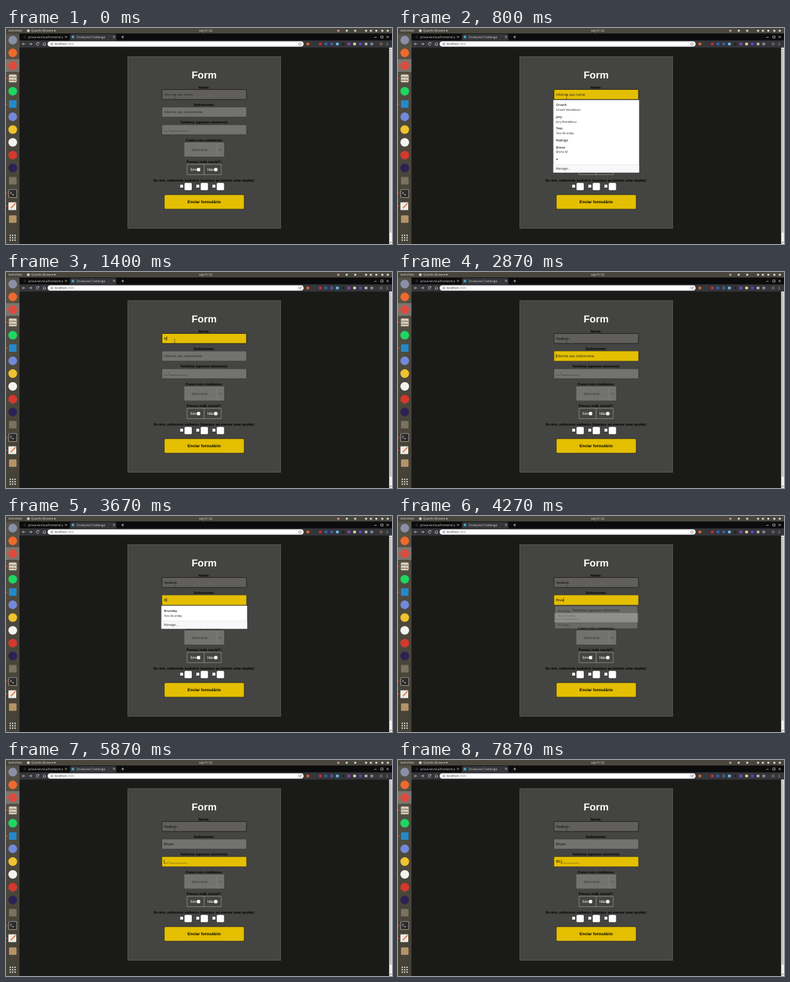
Recreate the animation shown at these times as an HTML page. Size 640x360 px, loop 8 s.

```html
<!DOCTYPE html>
<html lang="pt-BR">
<head>
<meta charset="utf-8">
<title>Form</title>
<style>
  html, body { margin: 0; width: 100%; height: 100%; overflow: hidden; background: #1a1a18; }
  svg { display: block; width: 640px; height: 360px; text-rendering: geometricPrecision; }
  text { white-space: pre; }
  .ui { font: 5.1px "Open Sans", "Noto Sans", sans-serif; fill: #deddda; }
  .page { font: 6px "Liberation Sans", Arial, sans-serif; }
  .label { font-weight: bold; text-anchor: middle; }
  .line { fill: none; stroke: #d0d0d0; stroke-width: .8; }
</style>
</head>
<body>
<svg viewBox="0 0 640 360">
  <defs>
    <linearGradient id="dockFill" x2="0" y2="1">
      <stop stop-color="#575349"/><stop offset=".4" stop-color="#4c483d"/><stop offset="1" stop-color="#454136"/>
    </linearGradient>
    <filter id="soft"><feGaussianBlur stdDeviation=".7"/></filter>
  </defs>

  <!-- desktop bar and browser frame -->
  <rect width="640" height="360" fill="#1a1a18"/>
  <rect width="640" height="9.3" fill="#49463e"/>
  <rect x="22" y="9.3" width="618" height="11.7" fill="#0c0c0d"/>
  <path d="M104 21q2 0 2-2v-6q0-3 3-3h71q3 0 3 3v6q0 2 2 2z" fill="#35363a"/>
  <rect x="22" y="20.6" width="618" height="12" fill="#35363a"/>
  <rect x="69" y="22.2" width="424.5" height="8.8" rx="4.4" fill="#fff"/>
  <g class="ui">
    <text x="4" y="6.4" font-size="5.5">Activities</text>
    <circle cx="37" cy="4.6" r="2.4" fill="#c9c9c7"/>
    <text x="42" y="6.4">Quenlo Browse</text>
    <path d="M79 3.7h4l-2 2.4z"/>
    <text x="331" y="6.4" text-anchor="middle">seg 01:26</text>
    <circle cx="31" cy="15" r="2.4" fill="#202124"/>
    <text x="37" y="16.7" font-size="5">prova-tecnica/frontend a</text>
    <circle cx="111" cy="15" r="2.3" fill="#3fa3c8"/>
    <text x="117" y="16.7" font-size="5">Orvalume Challenge</text>
    <text x="80.5" y="28.3" font-size="4.8" style="fill:#202124">localhost<tspan fill="#7b7f85">:3000</tspan></text>
  </g>
  <path class="line" d="M98 13.4l3 3m0-3l-3 3M177.5 13.4l3 3m0-3l-3 3M191 15h5m-2.5-2.5v5
    M32 26.6h-5m2.2-2.2l-2.2 2.2 2.2 2.2M38 26.6h5m-2.2-2.2l2.2 2.2-2.2 2.2
    M54.3 25.2a2.3 2.3 0 1 0 .2 2.3M54.6 23.8v1.8h-1.8
    M61 26.6l2.6-2.4 2.6 2.4M61.9 26.2v2.6h3.4v-2.6
    M610.5 15.5h4M621.5 13.2h3.6v3.6h-3.6zM631 13.2l3.6 3.6m0-3.6l-3.6 3.6"/>
  <path d="M76 25.6v2.4" stroke="#5f6368" stroke-width=".6"/>
  <circle cx="76" cy="26.6" r="1.9" fill="none" stroke="#5f6368" stroke-width=".6"/>
  <path d="M487.5 24l.8 1.9 2 .1-1.6 1.3.6 2-1.8-1.1-1.8 1.1.6-2-1.6-1.3 2-.1z" fill="none" stroke="#5f6368" stroke-width=".6"/>
  <circle cx="622" cy="26.6" r="2.8" fill="#6b5448"/>
  <g fill="#d0d0d0"><circle cx="632" cy="24.6" r=".6"/><circle cx="632" cy="26.6" r=".6"/><circle cx="632" cy="28.6" r=".6"/></g>
  <g id="tray"></g>
  <rect x="635.3" y="32.6" width="4.7" height="327.4" fill="#f1f1f1"/>
  <rect x="636" y="38" width="3.4" height="303" fill="#c3c3c1"/>
  <path d="M636.3 36.5h2.8l-1.4-2zM636.3 356.5h2.8l-1.4 2z" fill="#505050"/>

  <!-- dock -->
  <rect y="9.3" width="22.3" height="350.7" fill="url(#dockFill)"/>
  <rect y="52" width="22.3" height="21" fill="#fff" opacity=".22"/>
  <g id="dock"></g>

  <!-- form card -->
  <rect x="201.5" y="47.3" width="254.3" height="287" fill="#5c5c5a" filter="url(#soft)"/>
  <rect x="202.5" y="48.3" width="252.3" height="285" fill="#444442"/>
  <g class="page">
    <text class="label" x="328.5" y="84.3" font-size="16.7" fill="#fff">Form</text>
    <g id="labels"></g>
    <rect x="296" y="191" width="65.3" height="23" rx="1" fill="#727270" stroke="#8d8d8b" stroke-width=".35"/>
    <path d="M349.3 194v17.5" stroke="#92928f" stroke-width=".4"/>
    <path d="M353.8 201.8l1.6 1.6 1.6-1.6" fill="none" stroke="#222" stroke-width=".8"/>
    <text x="307.5" y="204.6" fill="#353533">Selecione...</text>
    <g fill="#fff">
      <path d="M300.2 227.2h56.6v17.2h-56.6zM328.5 227.2v17.2" fill="none" stroke="#ddd" stroke-width=".45"/>
      <text x="305.5" y="238.2">Sim</text><circle cx="319.2" cy="236" r="3"/>
      <text x="333.7" y="238.2">Não</text><circle cx="347.8" cy="236" r="3"/>
      <g id="networks"></g>
    </g>
    <rect x="262.6" y="278" width="132.2" height="23.8" rx="2" fill="#e4bf00" stroke="#000" stroke-width=".4"/>
    <text class="label" x="328.6" y="292.2" font-size="6.67">Enviar formulário</text>
  </g>
  <g id="live"></g>
</svg>
<script>
const LOOP = 8000, YELLOW = "#e4bf00", MASK = "__-_________";
const el = id => document.getElementById(id);
const square = (x, y, size, fill, r = 0) =>
  `<rect x="${x - size / 2}" y="${y - size / 2}" width="${size}" height="${size}" rx="${r}" fill="${fill}"/>`;
const disc = (x, y, r, fill) => `<circle cx="${x}" cy="${y}" r="${r}" fill="${fill}"/>`;
const text = (x, y, s, attrs = "") => `<text x="${x}" y="${y}" ${attrs}>${s}</text>`;

// Fixed details
el("tray").innerHTML =
  [551, 565, 579, 597, 605, 614, 624, 633].map((x, i) =>
    i % 2 ? disc(x, 4.6, 1.8, "#d5d4d1") : square(x, 4.6, 3.2, i ? "#d5d4d1" : "#d9a093", .6)).join("") +
  ["#e8632c", "#d02a33", "#2f62b8", "#3d5fae", "#6cc0e8", "#242528", "#8e44c9", "#e0d8b0", "#7040d0", "#b5b5b5", "#8b8c8f"]
    .map((c, i) => square(i ? 511.5 + i * 9.5 : 500.5, 26.6, 4.4, c, .8)).join("");

const dockColors = ["#8a8fa8", "#ee6a2b", "#dd4b3e", "", "#1ed760", "#2489ca", "#7289da", "#f0c22e",
  "#f2f4f0", "#d5382c", "#2c2255", "#77735f", "", "", "#b49468"];
el("dock").innerHTML = dockColors.map((c, i) => {
  const y = 20.2 + i * 21.3;
  if (i === 3) return square(11.2, y, 13, "#d8cfbf", 1.5) +
    `<path d="M5 ${y - 2}h12M5 ${y + 3}h12" stroke="#7d6c55" stroke-width="1.2"/>`;
  if (i === 12) return square(11.2, y, 14, "#b8b6b0", 1.5) + square(11.2, y, 12.5, "#2b2b2b", 1) +
    `<path d="M7 ${y - 3}l2 2-2 2m3 1h3" fill="none" stroke="#eee"/>`;
  if (i === 13) return square(10.5, y, 13, "#ecebe7", 1) +
    `<path d="M8 ${y + 3}l8-8" stroke="#e8772e" stroke-width="2"/>`;
  return [5, 11, 14].includes(i) ? square(11.2, y, 12.5, c, 1.5) : disc(11.2, y, 7.2, c);
}).join("") +
  [2, 3, 5, 12, 13].map(i => disc(1.2, 20.2 + i * 21.3, 1, "#e95420")).join("") +
  [0, 1, 2, 3, 4, 5, 6, 7, 8].map(i => square(7 + i % 3 * 4, 345.5 + (i / 3 | 0) * 4, 2.2, "#eee", .5)).join("");

el("labels").innerHTML = [
  [100.5, "Nome:"], [129.8, "Sobrenome:"], [159.1, "Telefone (apenas números):"], [188.5, "Como nos conheceu:"],
  [225.2, "Possui rede social?:"], [255.9, "Se sim, selecione embaixo (marque ao menos uma opção):"],
].map(([y, s]) => text(328.6, y, s, 'class="label"')).join("");

el("networks").innerHTML = [291.2, 318, 344.7].map(x =>
  square(x, 263.6, 4.8, "#fff", .6) + square(x + 10.8, 264.2, 12, "#fff", 1.5)).join("");

// Moving parts
const pen = document.createElement("canvas").getContext("2d");
pen.font = '60px "Liberation Sans", Arial, sans-serif';
const widthOf = s => pen.measureText(s).width / 10;
const typed = (word, times, t) => word.slice(0, times.filter(at => at <= t).length);

function field(y, value, { hint = "", focused, hovered, caret, caretAfter = value }) {
  const fill = focused ? YELLOW : hovered ? "#605f5c" : "#727270";
  const x = 262.3 + widthOf(caretAfter);
  return `<g class="page"><rect x="258.6" y="${y}" width="140.2" height="16.6" rx="1.3" fill="${fill}"
      stroke="#11110d" stroke-width="${hovered ? .8 : .35}"/>` +
    text(262, y + 10.2, value || hint, `fill="${value ? "#111" : "#30302e"}"`) +
    (focused && caret ? `<path d="M${x} ${y + 4.8}v6.6" stroke="#000" stroke-width=".6"/>` : "") + "</g>";
}

function menu(top, height, rows, openAt, closeAt, t) {
  if (t < openAt) return "";
  // The closing menu fades and shrinks in a few coarse ticks
  const p = t < closeAt ? 0 : Math.floor((t - closeAt) / 66) * .34;
  if (p >= 1) return "";
  const scale = 1 - .062 * p, cy = top + height / 2, bottom = top + height;
  let y = top + 10.4, body = "";
  for (const [name, full] of rows) {
    body += text(262, y, name, 'font-size="5.3" font-weight="600"');
    if (full) body += text(262, y + 7.7, full, 'font-size="4.8"');
    y += full ? 19.5 : 11.8;
  }
  return `<g class="ui" style="fill:#222" opacity="${(1 - p) ** 1.4}"
    transform="translate(328.7 ${cy}) scale(${scale}) translate(-328.7 ${-cy})">
    <rect x="257.6" y="${top}" width="142.2" height="${height}" rx=".8" fill="#fff" stroke="#a5a5a3" stroke-width=".4"/>
    <rect x="257.8" y="${bottom - 13}" width="141.8" height="12.8" fill="#f7f8f9"/>
    <path d="M257.8 ${bottom - 13}h141.8" stroke="#d5d6d8" stroke-width=".5"/>
    ${body}${text(262, bottom - 4.8, "Manage...")}</g>`;
}

const firstNames = [["Orveth", "Orveth Mandelour"], ["Jory", "Jory Mandelour"], ["Tess", "Tess Brundey"],
  ["Rodrigo"], ["Breno", "Breno M"], ["a"]];
const surnames = [["Brundey", "Tess Brundey"]];

function draw(t) {
  const first = typed("Nadeon", [1200, 1470, 1600, 1730, 2270, 2400], t);
  const last = typed("Bruso", [3670, 3870, 4130, 4270, 4470], t);
  const digits = t < 7530 ? "" : t < 7870 ? "8" : "85-";
  const caret = ![[800, 1200], [3400, 3670], [5270, 5870], [6470, 7070]].some(([a, b]) => t >= a && t < b);
  el("live").innerHTML =
    field(102.5, first, { hint: "Informe seu nome", focused: t >= 270 && t < 2870, hovered: true, caret }) +
    field(131.8, last, { hint: "Informe seu sobrenome", focused: t >= 2870 && t < 4670, caret }) +
    field(161.2, digits + MASK.slice(digits.length), { focused: t >= 4670, caret, caretAfter: digits }) +
    menu(120, 121, firstNames, 330, 1200, t) +
    menu(149.6, 38.4, surnames, 3670, 4130, t) +
    '<path d="M278.3 112.2h2.6M279.6 112.4v5.4M278.3 118h2.6" fill="none" stroke="#111" stroke-width=".5" opacity=".75"/>';
}

function tick() {
  draw(performance.now() % LOOP);
  requestAnimationFrame(tick);
}
tick();
</script>
</body>
</html>
```
